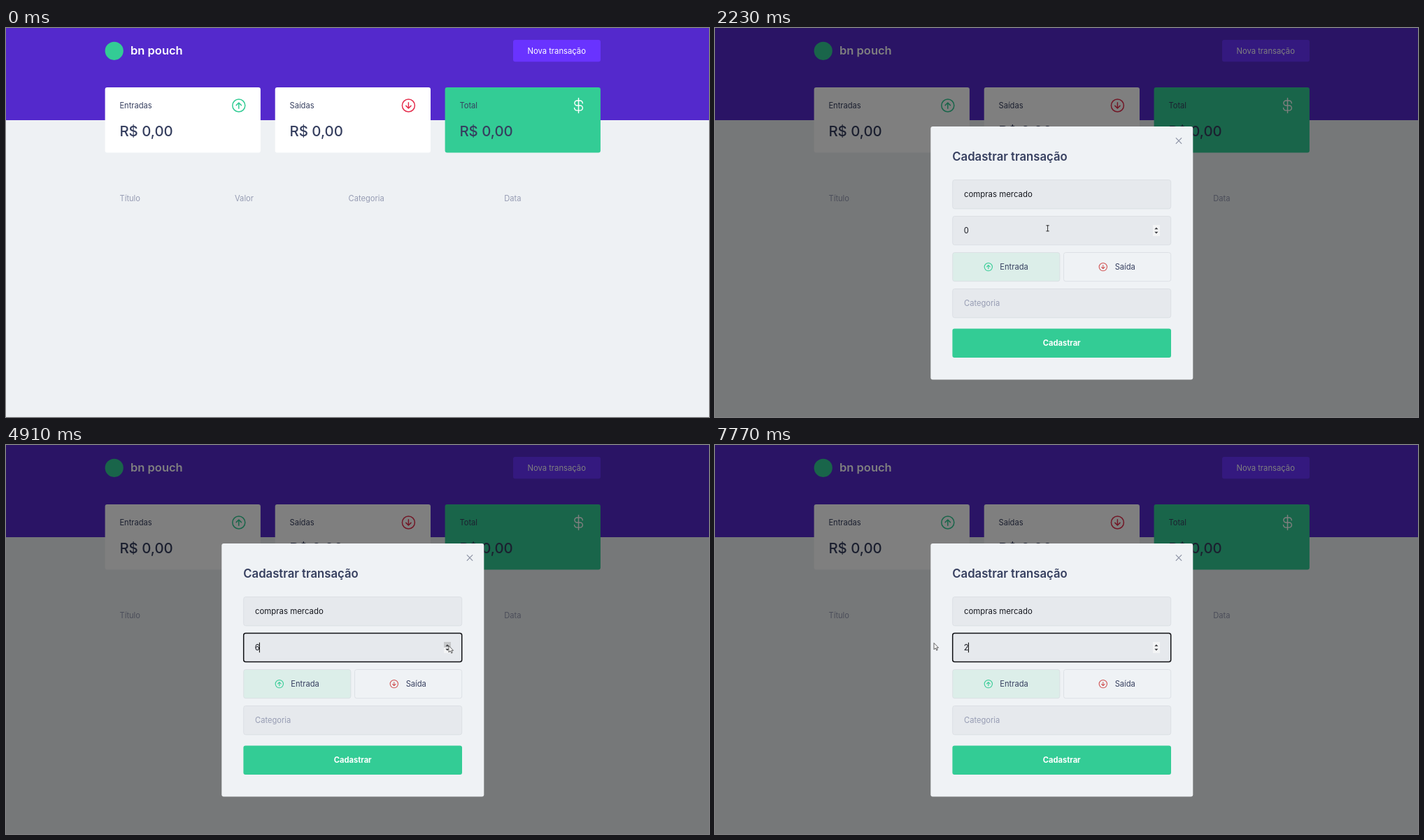
An HTML page for the animation above (8000 ms loop, 1005x557 px).

```html
<!DOCTYPE html>
<html lang="pt-BR">
<head>
<meta charset="utf-8">
<title>bn pouch</title>
<style>
  html, body { margin: 0; width: 100%; height: 100%; overflow: hidden; background: #eef1f4; }
  svg { display: block; width: 1005px; height: 557px; }
  text { font: 400 11.15px Inter, "Open Sans", sans-serif; fill: #363f5f; white-space: pre; }
  .line { fill: none; stroke-linecap: round; stroke-linejoin: round; }
  .sum { font-size: 20.4px; font-weight: 500; }
  .head { fill: #969cb3; }
  .field { fill: #e6e9ed; stroke: #d8dce1; stroke-width: .8; }
  .in { fill: #16181f; }
</style>
</head>
<body>
<svg viewBox="0 0 1005 557">
  <defs>
    <g id="up" class="line"><circle r="9"/><path d="M0 4.2V-3.8M-3.6 -.4L0 -4L3.6 -.4"/></g>
    <g id="down" class="line"><use href="#up" transform="rotate(180)"/></g>
  </defs>

  <rect width="1005" height="557" fill="#eef1f4"/>
  <rect width="1005" height="132" fill="#5429cc"/>
  <circle cx="154.7" cy="32.8" r="13.1" fill="#33cc95"/>
  <text x="178" y="38.3" style="font-size:16.5px;font-weight:600;fill:#fff">bn pouch</text>
  <rect id="newBtn" x="725" y="17" width="125" height="31.3" rx="3"/>
  <text id="newText" x="787.2" y="36.8" text-anchor="middle" style="font-size:11.25px">Nova transação</text>
  <g id="cards"></g>
  <use href="#up" x="332.8" y="111" stroke="#33cc95" stroke-width="1.5"/>
  <use href="#down" x="575.4" y="111" stroke="#e52e4d" stroke-width="1.5"/>
  <path class="line" transform="translate(807 99.5) scale(.96)" stroke="#fff" stroke-width="1.5"
    d="M12 1v22M18 8.5a3.8 3.8 0 0 0-3.8-3.8H9.8a3.6 3.6 0 0 0 0 7.3h4.6a3.7 3.7 0 0 1 0 7.4H9.6A3.8 3.8 0 0 1 5.8 15.5"/>
  <text class="head" x="162.5" y="247.7">Título</text>
  <text class="head" x="327" y="247.7">Valor</text>
  <text class="head" x="489.5" y="247.7">Categoria</text>
  <text class="head" x="712.3" y="247.7">Data</text>

  <g id="modal">
    <rect width="1005" height="557" opacity=".5"/>
    <rect x="308.3" y="141" width="375" height="362.5" rx="3" fill="#eff2f5"/>
    <path class="line" d="M659.2 157.7l7.6 7.6m0-7.6l-7.6 7.6" stroke="#8d93a5" stroke-width="1.2"/>
    <text x="339.3" y="189.8" style="font-size:16.7px;font-weight:600">Cadastrar transação</text>
    <rect class="field" x="339.7" y="217.5" width="312" height="41.3" rx="3"/>
    <text class="in" x="356" y="241.9" style="font-size:11.4px">compras mercado</text>
    <rect id="amountBox" class="field" x="339.7" y="269.5" width="312" height="41.1" rx="3"/>
    <rect id="selection" x="355.8" y="282" width="6.8" height="16" fill="#1a80f5"/>
    <text id="amount" class="in" x="355.8" y="294">0</text>
    <path id="caret" d="M362.4 282.8v14.4" stroke="#000" stroke-width="1"/>
    <g id="spinner">
      <rect x="626" y="282" width="10" height="16" fill="#f3f4f5"/>
      <rect id="spinUp" x="626" y="282" width="10" height="8" fill="#c6c8ca"/>
      <path d="M628.3 288.2l2.6-2.8 2.6 2.8zM628.3 291.8l2.6 2.8 2.6-2.8z" fill="#3c3e42"/>
    </g>
    <rect class="field" x="339.7" y="321.5" width="153.2" height="41.2" rx="3" style="fill:#dceee9"/>
    <rect class="field" x="498.5" y="321.5" width="153.2" height="41.2" rx="3" style="fill:none"/>
    <use href="#up" transform="translate(390.8 342.1) scale(.63)" stroke="#33cc95" stroke-width="1.7"/>
    <use href="#down" transform="translate(554.8 342.1) scale(.63)" stroke="#d05050" stroke-width="1.7"/>
    <text x="407.3" y="346">Entrada</text>
    <text x="571.7" y="346">Saída</text>
    <rect class="field" x="339.7" y="373.5" width="312" height="41.3" rx="3"/>
    <text class="head" x="356" y="398.1">Categoria</text>
    <rect x="339.4" y="430.6" width="312.6" height="41.5" rx="3" fill="#33cc95"/>
    <text x="495.7" y="455.4" text-anchor="middle" style="font-weight:700;fill:#fff">Cadastrar</text>
  </g>

  <g id="mouse">
    <circle id="press" r="7.6" cy=".8" fill="#dcd200"/>
    <path id="arrow" d="M0 0V9.3L2.2 7.3L3.8 10.6L5.2 9.9L3.7 6.8H6.5Z" fill="#fff" stroke="#222" stroke-width=".7"/>
    <path id="beam" class="line" d="M-1.8 -4H1.8M0 -4V4M-1.8 4H1.8" stroke="#222" stroke-width=".9"/>
    <path id="hand" d="M-.8 .8Q0 -.2 .8 .8V4L5 5.2Q6 5.6 5.6 7.4L4.6 10.8H.4L-2.8 6.8Q-2.6 5.4 -.8 6.4Z" fill="#fff" stroke="#333" stroke-width=".5"/>
  </g>
</svg>
<script>
const $ = id => document.getElementById(id);
const LOOP = 8000, OPEN = 1350, FOCUS = 2500, DRAG = 5560, RELEASE = 6120, TYPED = 7770;

$('cards').innerHTML = [['Entradas', 141.6, '#fff'], ['Saídas', 384.7, '#fff'], ['Total', 627.6, '#33cc95']]
  .map(([label, x, fill]) => `<rect x="${x}" y="85" width="222.3" height="93.6" rx="3" fill="${fill}"/>
    <text x="${x + 20.8}" y="115">${label}</text>
    <text class="sum" x="${x + 20.8}" y="154.8">R$ 0,00</text>`).join('');

// Mouse stops: time, x, y
const path = [[460, 965, 472], [1220, 773, 37.5], [1490, 773, 37.5], [1830, 530, 255],
  [2030, 530, 255], [2300, 465, 293], [3170, 465, 293], [3580, 555, 277], [4000, 633, 287.5],
  [5240, 633, 287.5], [5560, 478, 293], [6060, 313, 283.5]];
const clicks = [4200, 4340, 4450, 4560, 4660, 4770];

const clamp = v => Math.max(0, Math.min(1, v));
const show = (id, on) => $(id).setAttribute('visibility', on ? 'inherit' : 'hidden');
const within = (t, a, b) => t >= a && t < b;

function mouseAt(t) {
  const i = path.findIndex(p => p[0] > t);
  if (i < 0) return path.at(-1).slice(1);
  if (i === 0) return path[0].slice(1);
  const [a, b] = [path[i - 1], path[i]];
  const k = (t - a[0]) / (b[0] - a[0]), e = k * k * (3 - 2 * k);
  return [a[1] + (b[1] - a[1]) * e, a[2] + (b[2] - a[2]) * e];
}

function draw(t) {
  const [x, y] = mouseAt(t);
  const open = t >= OPEN, focused = t >= FOCUS, dragging = within(t, DRAG, RELEASE);
  const inRow = (top, bottom) => open && x > 339 && x < 652 && y > top && y < bottom;
  const overAmount = inRow(269, 311), overSpin = overAmount && x > 626;
  const selected = within(t, DRAG, TYPED) && (x < 359 || t > RELEASE);

  const hover = clamp((t - 1030) / 170) - clamp((t - 1500) / 200);
  const shade = 1 - .1 * hover;
  $('newBtn').style.fill = `rgb(${[105, 51, 255].map(c => c * shade)})`;
  $('newText').style.fill = `rgb(${[255, 255, 255].map(c => c * shade)})`;

  show('modal', open);
  $('amountBox').style.stroke = focused ? '#101114' : '';
  $('amountBox').style.strokeWidth = focused ? 1.5 : '';
  $('amount').textContent = t >= TYPED ? 2 : clicks.filter(c => t >= c).length;
  $('amount').style.fill = selected ? '#fff' : '';
  show('selection', open && selected);
  show('caret', focused && !within(t, 3230, 3730) && !within(t, DRAG, TYPED));
  show('spinner', open && (focused || overAmount));
  show('spinUp', overSpin);

  const hand = !open && x > 725 && x < 850 && y < 48;
  const beam = dragging || inRow(217, 259) && y > 217 || overAmount && !overSpin;
  show('mouse', t >= 460);
  $('mouse').setAttribute('transform', `translate(${x} ${y})`);
  show('hand', hand);
  show('beam', beam);
  show('arrow', !hand && !beam);

  const pressed = within(t, 1290, OPEN) || within(t, FOCUS, 2640) || dragging
    || clicks.some(c => within(t, c - 30, c + 30));
  $('press').setAttribute('opacity', pressed ? .5 : within(t, RELEASE, 6260) ? .25 : 0);
}

const start = performance.now();
function tick() {
  draw((performance.now() - start) % LOOP);
  requestAnimationFrame(tick);
}
tick();
</script>
</body>
</html>
```
